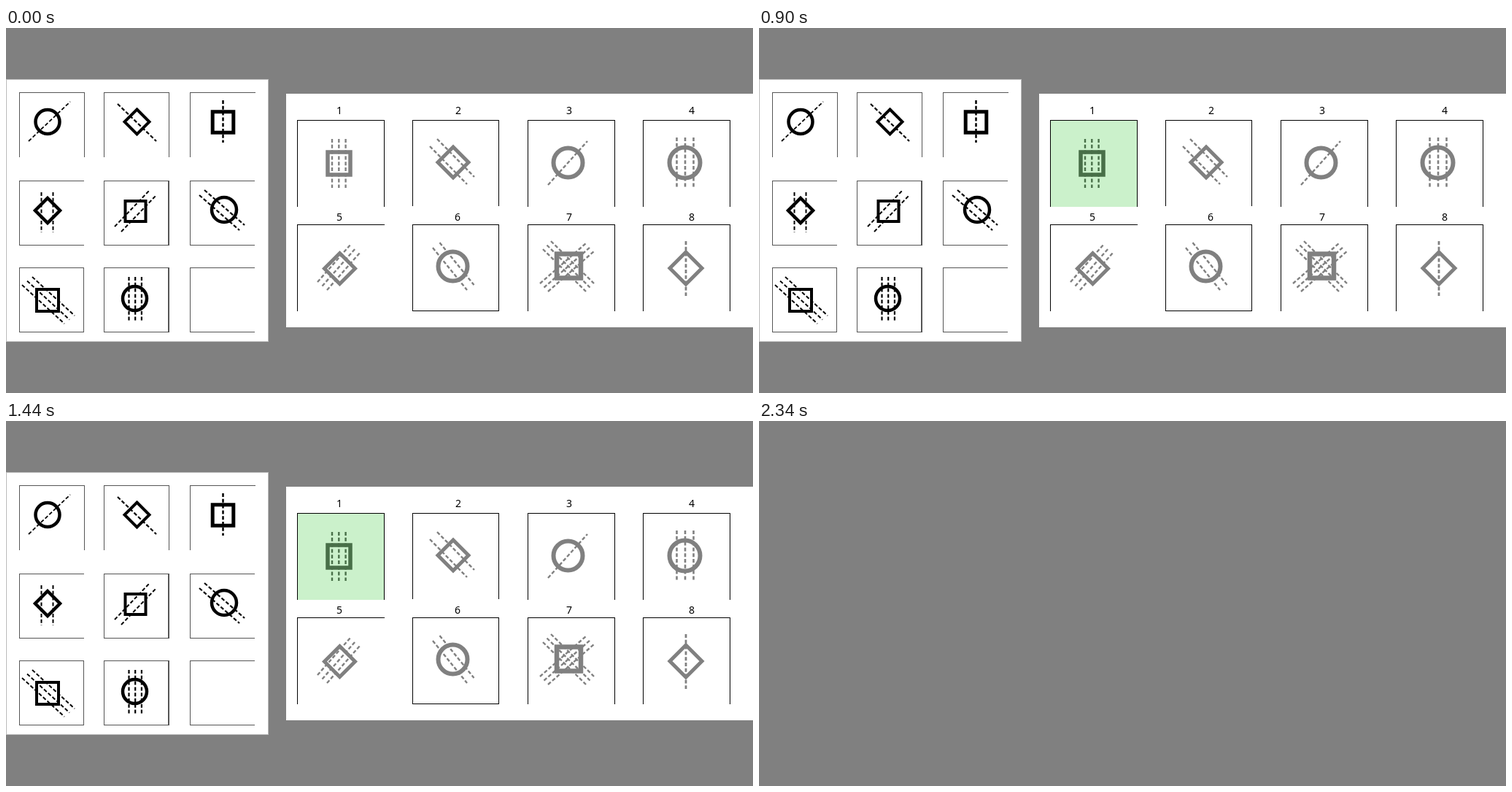
Write an HTML page with a canvas that moves like this. It is 1024 by 500 pixels and loops after 2.7 s.

```html
<!DOCTYPE html>
<html>
<head>
<meta charset="utf-8">
<style>
html, body { margin: 0; width: 100%; height: 100%; overflow: hidden; background: #808080; }
canvas { display: block; }
</style>
</head>
<body>
<canvas id="stage" width="1024" height="500"></canvas>
<script>
const ctx = document.getElementById('stage').getContext('2d');

function rect(x, y, w, h, color) {
  ctx.fillStyle = color;
  ctx.fillRect(x, y, w, h);
}

// Cell frame with only the listed sides: t, r, b, l
function cell(x, y, size, sides, color) {
  if (sides.includes('t')) rect(x, y, size + 1, 1, color);
  if (sides.includes('b')) rect(x, y + size, size + 1, 1, color);
  if (sides.includes('l')) rect(x, y, 1, size, color);
  if (sides.includes('r')) rect(x + size, y, 1, size, color);
}

function pen(color, width, dash = []) {
  ctx.strokeStyle = color;
  ctx.lineWidth = width;
  ctx.setLineDash(dash);
  ctx.beginPath();
}

// Shapes are sized along the middle of their outline
function circle(x, y, r, width, color) {
  pen(color, width);
  ctx.arc(x, y, r, 0, 7);
  ctx.stroke();
}

function square(x, y, r, width, color) {
  pen(color, width);
  ctx.rect(x - r, y - r, 2 * r, 2 * r);
  ctx.stroke();
}

function diamond(x, y, r, width, color) {
  pen(color, width);
  ctx.moveTo(x, y - r);
  ctx.lineTo(x + r, y);
  ctx.lineTo(x, y + r);
  ctx.lineTo(x - r, y);
  ctx.closePath();
  ctx.stroke();
}

// Parallel dashed lines, each shifted by (dx, dy) from the one before
function dashes(x1, y1, x2, y2, color, width, count = 1, dx = 0, dy = 0) {
  pen(color, width, [5, 2.8]);
  for (let i = 0; i < count; i++) {
    ctx.moveTo(x1 + i * dx, y1 + i * dy);
    ctx.lineTo(x2 + i * dx, y2 + i * dy);
  }
  ctx.stroke();
}

function drawMatrix() {
  const ink = '#000';
  rect(0, 70, 360, 360, '#fff');
  pen('#bbb', 1);
  ctx.strokeRect(0.5, 70.5, 359, 359);
  const sides = ['tlr', 'tlr', 'tl', 'tlb', 'tlbr', 'tlb', 'tlbr', 'tlbr', 'tlb'];
  sides.forEach((s, i) =>
    cell([18, 134, 252][i % 3], [88, 209, 328][i / 3 | 0], i < 3 ? 89 : 88.5 | 0, s, '#555'));
  for (const y of [209, 328]) rect(223, y, 1, 89, '#555');

  circle(57, 128.5, 16.5, 4.5, ink);
  dashes(31, 155, 88, 101, ink, 1.8);
  diamond(179.5, 128.5, 17, 4, ink);
  dashes(153, 104, 206, 155, ink, 2.2);
  square(297.5, 129, 14.3, 5, ink);
  dashes(297.5, 99, 297.5, 157, ink, 2.5);

  diamond(57, 250, 17, 4.5, ink);
  dashes(48.5, 225, 48.5, 280, ink, 2, 2, 16);
  square(177.5, 251, 14, 4, ink);
  dashes(149, 272, 197, 222, ink, 2, 2, 9, 7);
  circle(299, 249, 17, 4.5, ink);
  dashes(265, 229, 320, 277, ink, 2.2, 2, 7, -7);

  square(57, 373, 15, 4, ink);
  dashes(22, 352, 80, 405, ink, 2, 3, 7, -5.5);
  circle(176.5, 370.5, 16.5, 4.5, ink);
  dashes(168.5, 341, 168.5, 401, ink, 2.2, 3, 8.7);
}

function drawAnswers(picked) {
  const ink = '#808080';
  const first = picked ? '#486f48' : ink;
  rect(384, 90, 640, 320, '#fff');
  if (picked) rect(399, 127, 120, 118, '#cbf1cb');
  const sides = ['tlr', 'tlr', 'tlr', 'tlr', 'tl', 'tlbr', 'tlr', 'tlr'];
  const labelX = [457, 620, 772, 940];
  ctx.font = '14px "Noto Sans", "Open Sans", sans-serif';
  ctx.textAlign = 'center';
  sides.forEach((s, i) => {
    const y = i < 4 ? 126 : 269;
    cell([399, 557, 715, 873][i % 4], y, i % 4 === 1 ? 118 : 119, s, '#000');
    ctx.fillText(i + 1, labelX[i % 4] - (i === 5), y - (i < 4 ? 8 : 5));
  });

  square(456.5, 185.5, 15.5, 5.5, first);
  dashes(447, 152, 447, 219, first, 2.4, 3, 9.3);
  diamond(613, 184, 21, 5, ink);
  dashes(581, 162, 632, 214, ink, 2.4, 2, 10, -10);
  circle(770.5, 184.5, 20, 6, ink);
  dashes(743, 215, 797, 155, ink, 2.4);
  circle(930.5, 184.5, 21, 6, ink);
  dashes(919.5, 150, 919.5, 219, ink, 2.6, 3, 11.5);

  diamond(457.5, 329.5, 21, 5, ink);
  dashes(427, 348, 472, 297, ink, 2.4, 3, 6.5, 5.5);
  circle(612.5, 326.5, 20, 6, ink);
  dashes(585, 301, 632, 359, ink, 2.4, 2, 9.5, -7);
  square(771.5, 326, 16.5, 6.5, ink);
  dashes(732, 350, 796, 294, ink, 2.4, 3, 5.5, 5.5);
  dashes(736, 303, 795, 361, ink, 2.4, 3, 5.5, -5.5);
  diamond(932, 329, 22, 5, ink);
  dashes(932, 292, 932, 367, ink, 2.8);
}

function draw() {
  const phase = Math.floor(performance.now() % 2700 / 900);
  rect(0, 0, 1024, 500, '#808080');
  if (phase < 2) {
    drawMatrix();
    drawAnswers(phase === 1);
  }
  requestAnimationFrame(draw);
}
draw();
</script>
</body>
</html>
```
